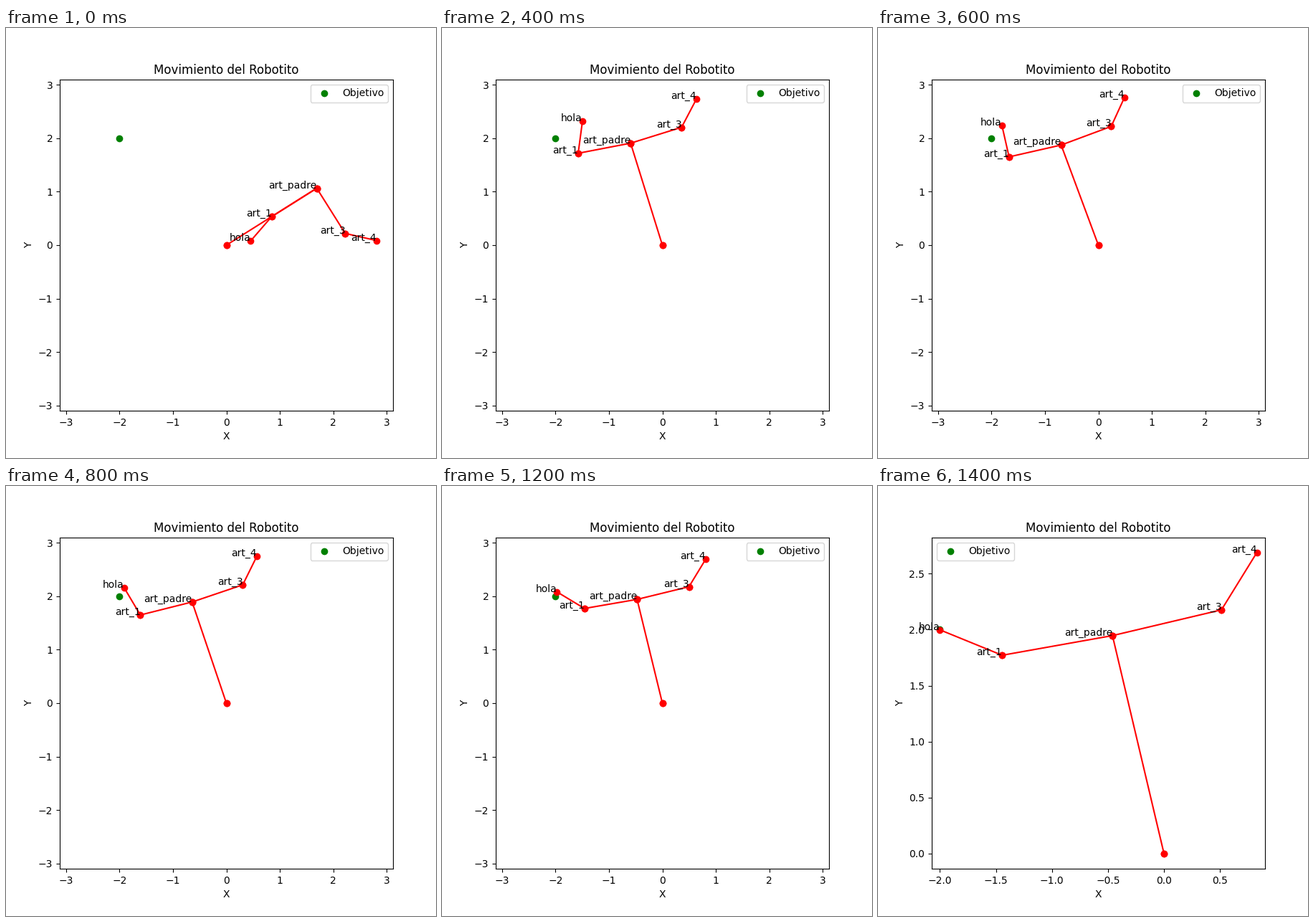
Recreate the animation shown at these times as a matplotlib script. Size 600 by 600 pixels, loop 1.5 s.

```python
import numpy as np
import matplotlib.pyplot as plt
from matplotlib.animation import FuncAnimation

GOAL = (-2, 2)
FRAMES = 15
STEP_MS = 100
ASPECT = 465 / 462
NAMES = ["art_padre", "art_1", "hola", "art_3", "art_4"]
PARENTS = [0, 1, 2, 1, 4]

# The arm turns steadily between a few key poses, angles in degrees
KEY_STEPS = [0, 2, 4, 6, 8, 12, 13]
SHOULDER = [32.2, 17.5, 107.3, 110.4, 108.7, 103.7, 103.3]
ELBOW = [180, 180.4, 83.6, 82.4, 85.4, 86.1, 86.8]
WRIST = [17, 120, 251.5, 270, 286.6, 319.1, 327.7]


def move(start, length, degrees):
    a = np.radians(degrees)
    return start + length * np.array([np.cos(a), np.sin(a)])


def solve(step):
    """Positions of the base and of the joints in the order of NAMES."""
    shoulder, elbow, wrist = (np.interp(step, KEY_STEPS, angles)
                              for angles in (SHOULDER, ELBOW, WRIST))
    base = np.zeros(2)
    parent = move(base, 2, shoulder)
    first = move(parent, 1, shoulder + elbow)
    tip = move(first, 0.6, shoulder + elbow + wrist)
    third = move(parent, 1, shoulder - 90)
    fourth = move(third, 0.6, shoulder - 45)
    return np.array([base, parent, first, tip, third, fourth])


fig, ax = plt.subplots(figsize=(6, 6), dpi=100)
ax.set_title("Movimiento del Robotito")
ax.set_xlabel("X")
ax.set_ylabel("Y")
ax.plot(*GOAL, "go", label="Objetivo")
legend = ax.legend(loc="upper right")
ax.plot(0, 0, "ro")
bones = [ax.plot([], [], "ro-")[0] for _ in NAMES]
labels = [ax.text(0, 0, name, ha="right") for name in NAMES]


def set_view(cx, cy, half):
    ax.set_xlim(cx - half * ASPECT, cx + half * ASPECT)
    ax.set_ylim(cy - half, cy + half)


def update(step):
    joints = solve(step)
    for bone, label, start, end in zip(bones, labels, PARENTS, joints[1:]):
        bone.set_data(*zip(joints[start], end))
        label.set_position(end)

    # The solved pose is shown in a view fitted to the arm
    if step == FRAMES - 1:
        right, top = joints[-1]
        set_view((GOAL[0] + right) / 2, top / 2, 0.55 * top)
        legend.set_loc("upper left")
    else:
        set_view(0, 0, 3.1)
        legend.set_loc("upper right")
    return [*bones, *labels]


anim = FuncAnimation(fig, update, frames=FRAMES, interval=STEP_MS,
                     repeat=True, repeat_delay=0, blit=False)
plt.show()
```
